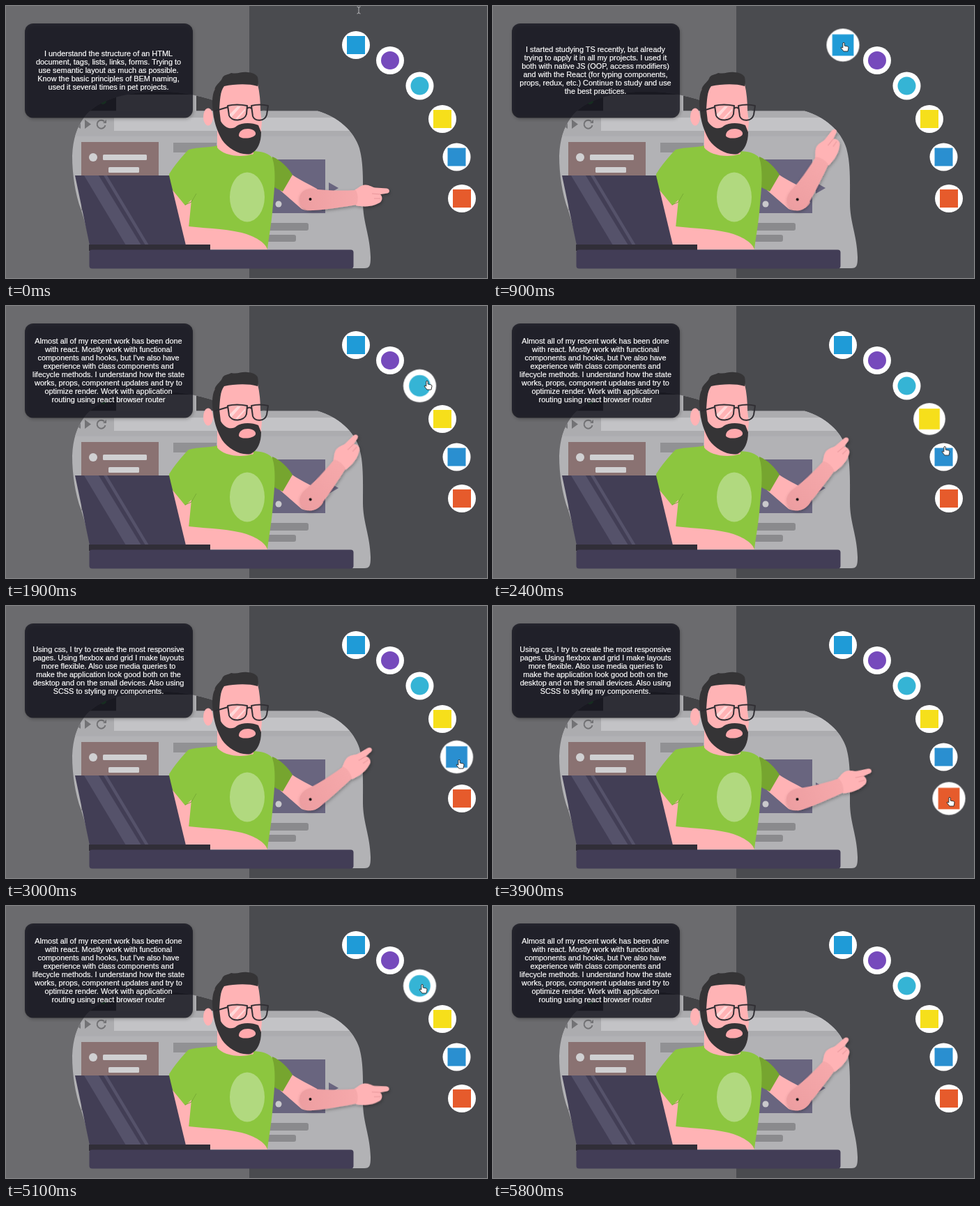
An HTML page for the animation above (6 s loop, 690 px wide and 390 px high).

```html
<!DOCTYPE html>
<html lang="en">
<head>
<meta charset="utf-8">
<title>Skills</title>
<style>
  html, body { margin: 0; width: 100%; height: 100%; overflow: hidden; background: #4a4b4f; }
  svg { display: block; width: 690px; height: 390px; }
  .copy { font: 10.9px "Liberation Sans", Arial, sans-serif; fill: #fff; stroke: #fff; stroke-width: .2; text-anchor: middle; }
  .icon { transform-box: fill-box; transform-origin: center; }
  #forearm { transform-origin: 437px 277px; }
</style>
</head>
<body>
<svg viewBox="0 0 690 390">
  <defs>
    <linearGradient id="skin" x1="0" x2="1">
      <stop offset="0" stop-color="#ed9ea1"/>
      <stop offset="1" stop-color="#f6a9ab"/>
    </linearGradient>
    <filter id="soft" x="-20%" y="-20%" width="140%" height="150%">
      <feDropShadow dx="1" dy="2" stdDeviation="2" flood-opacity=".3"/>
    </filter>
    <clipPath id="blob">
      <path d="M130 376C122 345 116 318 108 293C99 270 95 240 95 215C96 190 102 174 112 160C128 138 160 126 205 123C240 121 275 127 303 137L375 150.500H447C476 159 500 180 507 204C513 226 512 250 512 282C512 310 522 328 523 360C523 372 522 376 514 376Z"/>
    </clipPath>
  </defs>

  <rect width="349" height="390" fill="#6b6b6e"/>
  <rect x="349" width="341" height="390" fill="#4a4b4f"/>

  <!-- browser window -->
  <g clip-path="url(#blob)">
    <rect x="90" y="115" width="440" height="270" fill="#b2b2b5"/>
    <rect x="90" y="115" width="285" height="35.500" fill="#434346"/>
    <rect x="158" y="127" width="115" height="24" fill="#b0b0b3"/>
    <rect x="90" y="150.500" width="440" height="36" fill="#acacaf"/>
    <rect x="155" y="160" width="360" height="19" fill="#c3c3c6"/>
    <circle cx="115" cy="136" r="5" fill="#e0443c"/>
    <circle cx="126" cy="136" r="5" fill="#f2c12e"/>
    <circle cx="139" cy="136" r="5" fill="#38ad3e"/>
    <path d="M107 163V176L98 169.500ZM113 163V176L122 169.500Z" fill="#737376"/>
    <path d="M141 165.500A6 6 0 1 0 142.500 171" fill="none" stroke="#737376" stroke-width="2"/>
    <path d="M139 168H144V163Z" fill="#737376"/>
    <rect x="108" y="195" width="111" height="76" fill="#8a7272"/>
    <circle cx="125" cy="217" r="6" fill="#d0d0d2"/>
    <rect x="139" y="213" width="63" height="8" rx="1.500" fill="#d0d0d2"/>
    <rect x="147" y="231" width="44" height="8" rx="1.500" fill="#d0d0d2"/>
    <rect x="108" y="285" width="60" height="8" fill="#87878a"/>
    <rect x="240" y="196" width="62" height="14" fill="#919194"/>
    <rect x="330" y="220" width="128" height="77" fill="#69657f"/>
    <path d="M463 253L477 261L463 269Z" fill="#69657f"/>
    <circle cx="391" cy="284" r="4.500" fill="#c9c9cc"/>
    <rect x="340" y="311" width="94" height="11" rx="3" fill="#8a8a8d"/>
    <rect x="340" y="328" width="76" height="10" rx="3" fill="#8a8a8d"/>
  </g>

  <!-- man -->
  <path d="M409 241C420 249 434 255 446 262L455 282C448 295 432 295 424 291L393 264Z" fill="#ffb3b5"/>
  <path d="M382 216C394 221 404 231 411 242L397 266L381 258Z" fill="#76a52f"/>
  <path d="M236 258L270 276L266 330H250L236 280Z" fill="#ffb3b5"/>
  <path d="M262 206C276 202 292 203 304 200L352 208C368 208 378 212 382 218C388 235 385 262 383 285C381 312 377 330 375 349H256L262 318L266 278L257 286L234 258V241C242 228 252 216 262 206Z" fill="#8cc63f"/>
  <path d="M257 285L266 281L273 269" fill="none" stroke="#78ad35" stroke-width="1"/>
  <ellipse cx="346" cy="274" rx="25" ry="35.500" fill="#b1d97f"/>
  <path d="M250 314C278 319 310 318 338 325C357 330 372 339 375 349H255Z" fill="#ffb3b5"/>
  <path d="M303 165V203C310 213 335 219 355 212L352 185Z" fill="#ffb3b5"/>
  <path d="M305 182C313 203 330 212 354 213V209L310 175Z" fill="#ec9fa2"/>
  <ellipse cx="290" cy="159" rx="7" ry="12.500" fill="#ffb3b5"/>
  <path d="M299 120C306 108 351 106 361 112C364 125 365 137 365 150L367 167L364 196L325 195L300 168Z" fill="#ffb3b5"/>
  <path d="M297 151C295 139 296 127 299 121C300 113 307 110 310 104C312 98 318 99 323 96C333 98 337 94 346 95C353 95 359 98 361 102C362 107 362 111 361 115C347 111 328 112 313 115C307 122 307 136 306 148L308 165C314 176 325 178 331 172C338 167 353 167 362 171L366 181C366 196 361 207 351 212C337 215 319 205 310 192C302 178 298 164 297 151Z" fill="#353436"/>
  <path d="M334 186C334 179 340 176 347 176C354 176 359 180 358 184C356 190 337 192 334 186Z" fill="#ffa9ad"/>
  <path d="M320 156L332 144H337L323 160ZM329 162L343 147V150L332 162Z" fill="#fff" opacity=".5"/>
  <path d="M298 151L318 145M318 143Q331 140 346 143L345 155C342 166 323 166 320 157ZM346 147Q349 144 352 147M352 143Q364 140 376 143L374 156C371 166 357 166 354 158Z" fill="none" stroke="#302e33" stroke-width="2" stroke-linejoin="round"/>

  <!-- laptop and desk -->
  <path d="M99 243H234L258 343H120Z" fill="#423e55"/>
  <path d="M112 243H133L194 343H172ZM140 243H145L205 343H200Z" fill="#55526a"/>
  <rect x="119" y="342" width="174" height="9" fill="#312e38"/>
  <rect x="119.500" y="349.500" width="379" height="27" rx="4" fill="#423d56"/>

  <g filter="url(#soft)">
    <g id="forearm">
      <path d="M500 264C505 261 509 257 515 256.500C521 256 525 260 530 260.500L546 261.500C551 262 551 268 547 268.500L537 270C541 274 540 281 534 283C527 287 516 289 502 286Z" fill="#ffb3b5"/>
      <path d="M537 270L525 269M537 276L528 276" fill="none" stroke="#e8979b" stroke-width="1"/>
      <path d="M421 277C421 266 430 261 440 262C461 265 481 265 502 264Q507 274 503 285C483 288 462 292 440 293C428 293 421 287 421 277Z" fill="url(#skin)"/>
      <circle cx="436.500" cy="277" r="2" fill="#111"/>
    </g>
  </g>

  <rect x="27" y="25" width="241" height="135.500" rx="12" fill="#161618" fill-opacity=".75" filter="url(#soft)"/>
  <g id="panel"></g>
  <g id="icons"></g>
  <g id="pointer">
    <path class="cursor" d="M-2.500 -5Q0 -5 0 -3Q0 -5 2.500 -5M0 -3V3M-2.500 5Q0 5 0 3Q0 5 2.500 5" fill="none" stroke="#b5b5b7"/>
    <path class="cursor" d="M0 0V11L2.600 8.700L4.500 13L6.300 12.200L4.500 8H8Z" fill="#fff" stroke="#222" stroke-width=".8"/>
    <path class="cursor" d="M-1.200 -5Q0 -6.500 1.200 -5V-1L6 0Q7 .5 7 2L6 7H0L-4 2Q-4 0 -1.200 2Z" fill="#fff" stroke="#222" stroke-width=".9" stroke-linejoin="round"/>
  </g>
</svg>
<script>
const LOOP = 6000, FADE = 150, SWING = 500;
const $ = id => document.getElementById(id);

function add(parent, tag, attrs) {
  const el = document.createElementNS("http://www.w3.org/2000/svg", tag);
  for (const key in attrs) el.setAttribute(key, attrs[key]);
  return parent.appendChild(el);
}

// steps: [time in ms, value, easing to the next step]
function play(el, prop, steps, format = v => v) {
  const all = [...steps];
  if (all[0][0] > 0) all.unshift([0, all[0][1]]);
  if (all.at(-1)[0] < LOOP) all.push([LOOP, all.at(-1)[1]]);
  const frames = all.map(([t, v, easing = "linear"]) =>
    ({ offset: t / LOOP, [prop]: format(v), easing }));
  el.animate(frames, { duration: LOOP, iterations: Infinity }).startTime = 0;
}

function show(el, spans) {
  const steps = spans.flatMap(([from, to]) => [[from, 1, "step-end"], [to, 0, "step-end"]]);
  if (steps[0][0] > 0) steps.unshift([0, 0, "step-end"]);
  play(el, "opacity", steps);
}

const copy = [
  { spans: [[0, 650], [4220, 5060]], lines: [
    "I understand the structure of an HTML",
    "document, tags, lists, links, forms. Trying to",
    "use semantic layout as much as possible.",
    "Know the basic principles of BEM naming,",
    "used it several times in pet projects."] },
  { spans: [[650, 1600]], lines: [
    "I started studying TS recently, but already",
    "trying to apply it in all my projects. I used it",
    "both with native JS (OOP, access modifiers)",
    "and with the React (for typing components,",
    "props, redux, etc.) Continue to study and use",
    "the best practices."] },
  { spans: [[1600, 2870], [5060, LOOP]], lines: [
    "Almost all of my recent work has been done",
    "with react. Mostly work with functional",
    "components and hooks, but I've also have",
    "experience with class components and",
    "lifecycle methods. I understand how the state",
    "works, props, component updates and try to",
    "optimize render. Work with application",
    "routing using react browser router"] },
  { spans: [[2870, 4220]], lines: [
    "Using css, I try to create the most responsive",
    "pages. Using flexbox and grid I make layouts",
    "more flexible. Also use media queries to",
    "make the application look good both on the",
    "desktop and on the small devices. Also using",
    "SCSS to styling my components."] }
];

for (const { spans, lines } of copy) {
  const text = add($("panel"), "text", { class: "copy" });
  lines.forEach((line, i) => {
    const y = 96 + 12 * (i - (lines.length - 1) / 2);
    add(text, "tspan", { x: 147, y }).textContent = line;
  });
  show(text, spans);
}

// x, y, colour, round mark, hover spans
const icons = [
  [502, 56, "#1f9bd7", false, [[400, 1080]]],
  [551, 78, "#764abc", true, [[1150, 1240]]],
  [593.5, 114.5, "#35b4d5", true, [[1260, 2170], [4900, 5350]]],
  [626, 162, "#f6df1b", false, [[2210, 2370], [4770, 4850]]],
  [646.5, 216.5, "#2a8fd0", false, [[2400, 3380]]],
  [654, 276, "#e65b2c", false, [[3480, 4700]]]
];

for (const [x, y, fill, round, spans] of icons) {
  const icon = add($("icons"), "g", { class: "icon" });
  add(icon, "circle", { cx: x, cy: y, r: 20, fill: "#fff" });
  if (round) add(icon, "circle", { cx: x, cy: y, r: 13, fill });
  else add(icon, "rect", { x: x - 13, y: y - 13, width: 26, height: 26, fill });
  const steps = spans.flatMap(([from, to]) =>
    [[from, 1], [Math.min(from + FADE, to), 1.18], [to, 1.18], [to + FADE, 1]]);
  play(icon, "transform", steps, s => `scale(${s})`);
}

// start time, start angle, end angle
const swings = [
  [680, 0, -75],
  [1600, -75, -44.5],
  [2885, -44.5, -15.3],
  [4220, -15.3, 0],
  [5075, 0, -44.5]
];
play($("forearm"), "transform",
  swings.flatMap(([t, from, to]) => [[t, from, "ease"], [t + SWING, to]]),
  a => `rotate(${a}deg)`);

play($("pointer"), "transform", [
  [100, [506, 6]], [450, [503, 58]], [1050, [503, 58]], [1200, [552, 82]],
  [1390, [604, 113]], [2100, [604, 113]], [2290, [627, 165]], [2400, [648, 207]],
  [2600, [650, 226]], [3300, [650, 226]], [3550, [655, 280]], [4620, [655, 280]],
  [4800, [627, 165]], [5000, [597, 118]], [5280, [597, 118]], [5400, [575, 145]]
], ([x, y]) => `translate(${x}px, ${y}px)`);

const [beam, arrow, hand] = document.querySelectorAll(".cursor");
const hovers = icons.flatMap(icon => icon[4]).sort((a, b) => a[0] - b[0]);
show(beam, [[0, 200]]);
show(hand, hovers);
show(arrow, [200, ...hovers.map(h => h[1])].map((t, i) => [t, i < hovers.length ? hovers[i][0] : 5400]));
</script>
</body>
</html>
```
